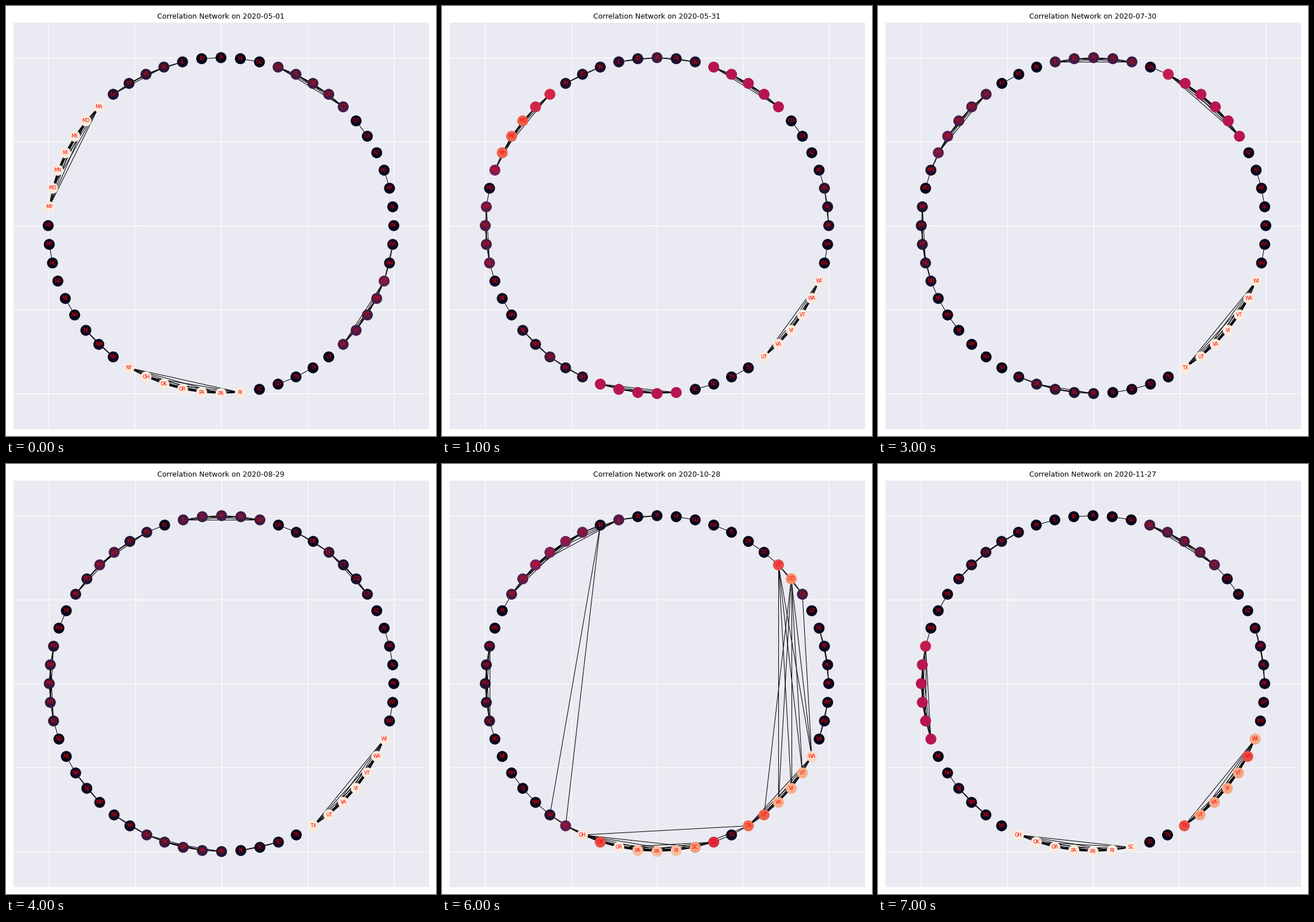
A matplotlib script that plays this animation: 748x748 px, repeating every 8 s.

```python
from itertools import combinations

import matplotlib.pyplot as plt
import numpy as np
from matplotlib.animation import FuncAnimation
from matplotlib.collections import LineCollection
from matplotlib.colors import LinearSegmentedColormap

SIZE = 748
DPI = 74.8
STEP_MS = 1000

plt.rcParams["font.family"] = "DejaVu Sans"

NODES = (
    "AK AL AR AS AZ CA CO CT DC DE FL GA GU HI IA ID IL IN KS KY LA MA MD ME "
    "MI MN MO MP MS MT NC ND NE NH NJ NM NV NY OH OK OR PA PR RI SC SD TN TX "
    "UT VA VI VT WA WI WV WY"
).split()
INDEX = {name: i for i, name in enumerate(NODES)}
ANGLE = 2 * np.pi * np.arange(len(NODES)) / len(NODES)
POS = np.column_stack([np.cos(ANGLE), np.sin(ANGLE)])

ROCKET = LinearSegmentedColormap.from_list("rocket", [
    "#03051a", "#35193e", "#701f57", "#b81553",
    "#e13342", "#f37651", "#f6b48f", "#faebdd"])

# "A:B" joins every pair of nodes from A to B; "A-B,C" joins A to B and to C.
MONTHS = [
    "AR:AS CA:CO CT:GA GU:HI IA:ID IL:KS IN:LA MA:MP MT:NC NE:NH NJ:NV NY:RI "
    "SD:TN TN:TX VA:WI WI:WY",

    "AK:AR AR:AS CA:CO CT:GA GU:IA IA:IL IN:KY LA:MI MD:MN MO:MP MP:NC NC:ND "
    "NE:NH NJ:NV NV:OH OK:RI SC:SD TN:TX UT:WI WV:WY",

    "AL:AS CA:FL FL:IN KS:KY LA:ME MA:MI MN:MO MP:NC MT:ND ND:NE NH:NJ NM:OH "
    "NY:OR OH:PR SD:VI TX:WI WV:WY RI:SC "
    "PA-IL,ID,IA,HI,GU SC-IN,ID,IA,HI,GU,FL,PA,PR,SD,VA,VI PR-GU "
    "FL-VA,VI,WI",

    "AL:AR AR:AS CA:FL FL:GA GU:IL KS:KY LA:MI ME:MN MN:MO MP:NC MT:ND ND:NE "
    "NE:NH NH:NJ OH:OR OK:PR RI:SC SC:SD TX:WI WV:WY",

    "AL:AR AR:AS CA:DC DC:FL FL:GA GU:IL IN:KS KS:MA LA:ME MI:MN MO:MT MP:NC "
    "NC:ND NE:NH NH:NM NV:OH OH:PA OK:PR RI:SD TX:WI WV:WY",

    "AL:AS CA:DC DC:DE FL:GA GA:GU GU:ID IL:IN KS:MD LA:ME MO:NC NC:ND NH:NM "
    "NJ:NV NV:OR OK:PR PA:SC PR:SD TX:WI WV:WY "
    "IL-ID,IA,GA NV-PA WY-NV,OK,OR,PA WV-OR,PA",

    "AK:AR AL:AS CA:CT CT:DC DC:DE FL:GA GU:HI IA:IL KS:MD KY:ME ME:MI MO:NC "
    "NC:ND NH:NJ NJ:NM NM:NV NV:OH NY:OK OH:RI OR:SD SD:TN TN:TX TX:WA WI:WY "
    "IL-KS,KY,LA,MA IN-KS,NV,NY NY-OR OH-SC,TX SC-TX "
    "CT-VA,VI,VT,WA CO-UT,VA,VI,VT,WA CA-WA",

    "AK:AR AL:AS CA:CO CO:CT CT:GA GU:HI IA:ID IL:IN KS:LA KY:MA LA:MD ME:MI "
    "MN:MO MO:ND NH:NJ NJ:NV OH:SC TX:VT UT:WI TX-WI",
]


def read_edges(spec):
    edges = set()
    for item in spec.split():
        if ":" in item:
            first, last = (INDEX[n] for n in item.split(":"))
            edges.update(combinations(range(first, last + 1), 2))
        else:
            hub, ends = item.split("-")
            for end in ends.split(","):
                edges.add(tuple(sorted((INDEX[hub], INDEX[end]))))
    return np.array(sorted(edges))


def centrality(edges):
    """Subgraph centrality (diagonal of exp(A)), scaled to 0..1."""
    adj = np.zeros((len(NODES), len(NODES)))
    adj[edges[:, 0], edges[:, 1]] = 1
    values, vectors = np.linalg.eigh(adj + adj.T)
    score = vectors ** 2 @ np.exp(values)
    return (score - score.min()) / (score.max() - score.min())


def limits(coords):
    """Pad the linked nodes by 5 %, then add the 5 % axes margin."""
    low, high = coords.min(), coords.max()
    pad = 0.05 * (high - low)
    low, high = min(low - pad, -1), max(high + pad, 1)
    margin = 0.05 * (high - low)
    return low - margin, high + margin


fig = plt.figure(figsize=(SIZE / DPI, SIZE / DPI), dpi=DPI, facecolor="white")
ax = fig.add_axes([12.5 / SIZE, 12.5 / SIZE, 723 / SIZE, 707 / SIZE])


def draw(frame):
    edges = read_edges(MONTHS[frame])
    score = centrality(edges)
    linked = POS[np.unique(edges)]

    ax.clear()
    ax.set_facecolor("#eaeaf2")
    ax.set_axisbelow(True)
    ax.grid(True, color="white", linewidth=1)
    ax.tick_params(length=0, labelbottom=False, labelleft=False)
    for spine in ax.spines.values():
        spine.set_visible(False)
    ticks = np.linspace(-1, 1, 5)
    ax.set_xticks(ticks)
    ax.set_yticks(ticks)

    ax.add_collection(LineCollection(POS[edges], colors="black",
                                     linewidths=1, zorder=1))
    ax.scatter(*POS.T, s=300, c=ROCKET(score), linewidths=1, zorder=2)
    for name, (x, y), value in zip(NODES, POS, score):
        # labels sink into the crimson part of the scale
        alpha = 0.15 if 0.38 < value < 0.52 else 1
        ax.text(x, y, name, color="red", size=8, alpha=alpha,
                ha="center", va="center", zorder=3)

    ax.set_xlim(limits(linked[:, 0]))
    ax.set_ylim(limits(linked[:, 1]))
    date = np.datetime64("2020-05-01") + 30 * frame
    ax.set_title(f"Correlation Network on {date}", fontsize=12, pad=6)
    return []


anim = FuncAnimation(fig, draw, frames=len(MONTHS), interval=STEP_MS,
                     init_func=lambda: [], repeat=True, repeat_delay=0)

plt.show()
```
